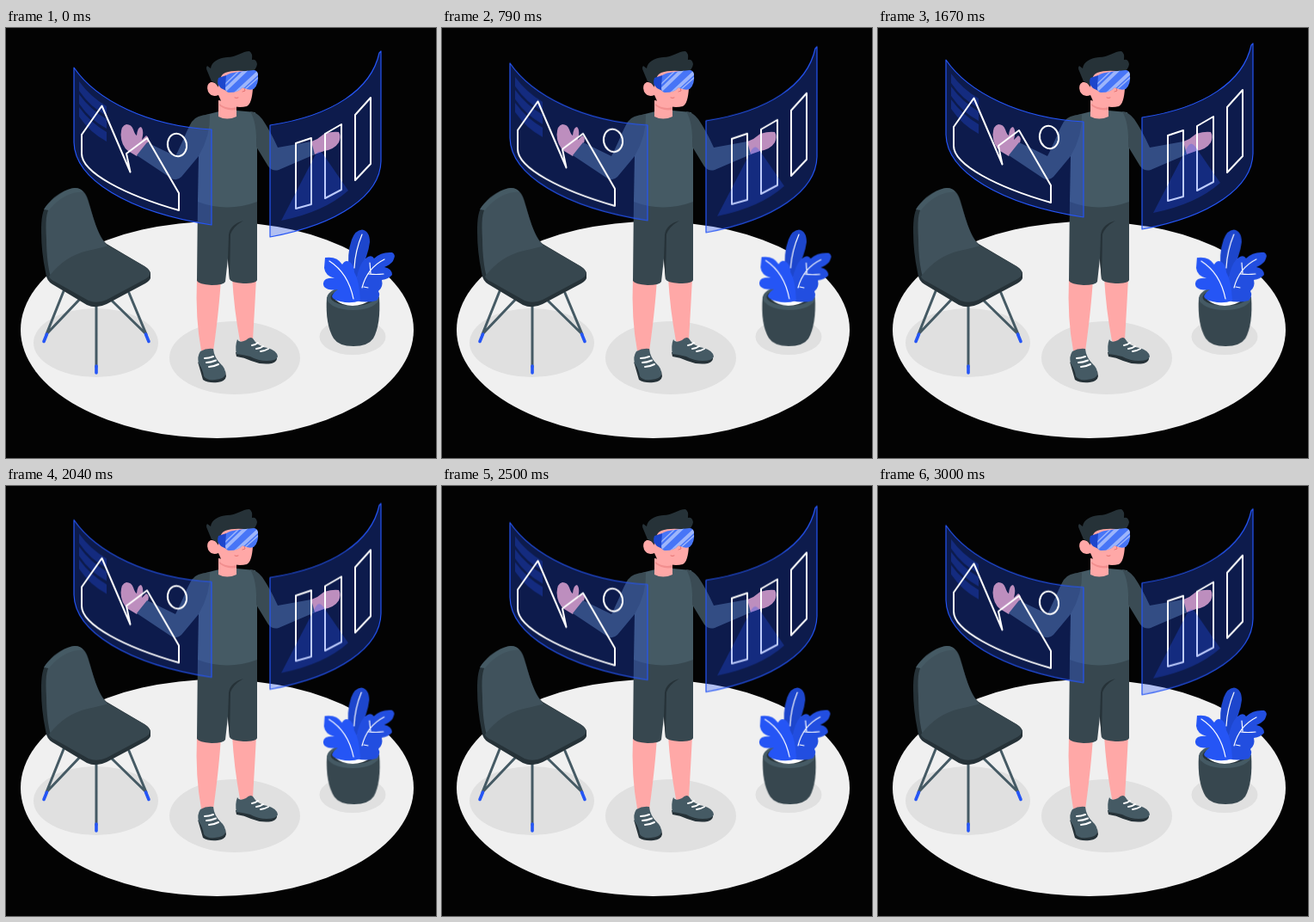
An HTML page that plays this animation: 500x500 px, repeating every 3040 ms.

```html
<!DOCTYPE html>
<html lang="en">
<head>
<meta charset="utf-8">
<title>Virtual reality workspace</title>
<style>
  :root { --blue: #2555f5; --ink: #263238; --dark: #37474f; --mid: #455a64; --skin: #ffa8a7; }
  html, body { margin: 0; width: 100%; height: 100%; overflow: hidden; background: #030303; }
  svg { display: block; width: 100%; height: 100%; }
  .blue { fill: var(--blue); }
  .ink { fill: var(--ink); }
  .dark { fill: var(--dark); }
  .mid { fill: var(--mid); }
  .sleeve { fill: #3a4b54; }
  .skin { fill: var(--skin); }
  .shade { fill: #e0e0e0; }
  .line { fill: none; stroke-linecap: round; stroke-linejoin: round; }
  .glass { fill: var(--blue); fill-opacity: .3; stroke: var(--blue); stroke-width: 1.2; stroke-linejoin: round; }
  .tint { fill: var(--blue); opacity: .3; }
  .chart { fill: none; stroke: #fff; stroke-width: 2; stroke-linejoin: round; }
  .float { animation: float 3040ms linear infinite; }
  .sway { transform-box: view-box; transform-origin: 411px 302px; animation: sway 3040ms linear infinite; }
  @keyframes float { 50% { transform: translateY(-10px); } }
  @keyframes sway {
    25% { transform: rotate(1deg); }
    75% { transform: rotate(-1deg); }
  }
</style>
</head>
<body>
<svg viewBox="0 0 500 500">
  <defs>
    <clipPath id="visor"><path d="M256 55Q260 52 270 51L288 49Q292 49 293 54Q294 66 288 71Q282 73 275 69Q270 75 260 75Q255 75 255 69Z"/></clipPath>
  </defs>

  <ellipse cx="245.5" cy="351" rx="228.5" ry="126" fill="#f0f0f0"/>
  <g class="shade">
    <ellipse cx="104.5" cy="366" rx="72.5" ry="40"/>
    <ellipse cx="266" cy="383.5" rx="76" ry="42.5"/>
    <ellipse cx="403" cy="359" rx="38.5" ry="21"/>
  </g>

  <!-- chair -->
  <g class="line" stroke-width="3">
    <path stroke="#455a64" d="M67 306 47 356M87 314 48 355M105 320V394M143 308 163 356M122 316 163 356"/>
    <path stroke="#2555f5" stroke-width="3.6" d="M47.500 356 44 364.500M105 393V401M162.500 356 166 364.500"/>
  </g>
  <path class="ink" d="M41 237C41 222 42 211 49 204C57 194 69 187 80 186C87 186 92 190 95 198C101 217 106 241 117 251L161 277Q168 281 168 286V291Q167 294 162 297L117 321Q105 327 94 322L54 298Q47 294 46 284Q41 260 41 237Z"/>
  <path fill="#40525c" d="M47 246C46 226 46 214 52 207C60 197 71 189 81 187C88 187 92 191 95 200C101 218 106 241 117 252L119 254L60 291L52 289C49 280 47 262 47 246Z"/>
  <path class="mid" d="M44 211C52 199 68 187 80 186Q87 186 90 191C75 189 58 201 50 212Z"/>
  <path class="dark" d="M50 289C62 273 77 263 95 259Q109 256 119 253L161 277Q168 282 167 287Q166 290 160 293L117 316Q106 321 96 317L57 295Q52 293 50 289Z"/>

  <!-- legs and shoes -->
  <path class="skin" d="M222 291H250Q248 326 241 376Q234 379 227 375Q220 338 222 291ZM263 290H291Q289 330 287 362Q280 368 272 364Q265 326 263 290Z"/>
  <path class="ink" d="M223 388 229 409Q235 413 246 412Q255 411 256 405L255 399 234 400Z"/>
  <path class="mid" d="M226 376Q233 372 241 373Q242 383 249 390Q256 396 255 403Q254 408 243 409Q233 410 230 405Q229 397 224 390Q222 382 226 376Z"/>
  <path class="ink" d="M267 377 268 382Q277 383 285 387Q297 392 309 390Q316 388 315 382Z"/>
  <path class="mid" d="M269 362Q271 367 279 363Q284 358 287 361Q292 370 304 372Q315 375 316 382Q315 387 303 387Q293 387 284 382Q276 380 268 379Q266 370 269 362Z"/>
  <path class="line" stroke="#fff" stroke-width="2" d="M231 384Q236 384 241 382M233 389Q238 389 244 386.500M236 394Q241 394 247 391M286 369Q289 369 293 366M291 373Q295 373 299 370M296 376Q300 376 305 373"/>

  <!-- shorts -->
  <path class="dark" d="M223 198H292V293Q291 297 276 297Q261 296 260 292L258 268 255 295Q253 299 239 299Q224 298 222 294Z"/>
  <path class="ink" d="M276 224Q261 228 259 240L258 270 260 293 261 240Q264 231 276 224Z"/>

  <!-- hands -->
  <path class="skin" d="M152 149 142 143Q134 137 133.500 124Q134 113 140 112Q146 112 148 118Q150 124 152 125Q153 115 157 115Q160 118 159 125L158 130 163 125Q168 127 164 136Z"/>
  <path class="skin" d="M353 133 362 129 370 123Q380 120 387 121Q390 126 387 133Q382 141 370 143L356 148Z"/>

  <!-- shirt -->
  <path class="mid" d="M248 97 232 101 224 148 223 202Q257 215 292 202V138L290 98 268 96Z"/>
  <path class="sleeve" d="M237 100.500Q221 101 216 109C210 119 205 134 197 149L164 133 152 148 191 174Q198 179 204 173L224 149Q238 125 237 100.500Z"/>
  <path class="sleeve" d="M284 97Q292 98 298 106Q307 119 316 139L355 132 359 147 317 165Q310 167 305 161L291 138Q292 110 284 97Z"/>

  <!-- head -->
  <path class="skin" d="M247 84V103Q257 108 268 103V88Z"/>
  <path fill="#f28f8f" d="M248 88Q257 95 268 92L268 95Q256 97 248 90Z"/>
  <path class="skin" d="M245 53Q265 41 286 51L287 70Q286 88 280 91Q267 94 251 87L247 78Q239 81 235 74Q232 66 238 63Q244 62 247 69Z"/>
  <path class="ink" d="M239 62Q236 55 234 50Q232 46 234 44L238 47C239 39 247 35 257 34C268 34 275 27 283 27Q287 29 286 37Q291 36 292 42Q291 49 285 51Q266 48 255 52Q250 54 249 60L246 68Q245 64 239 62Z"/>
  <path class="line" stroke="#e57373" stroke-width="1" d="M266 81Q268 82 270 81M277 70 278 73 275 74"/>
  <path fill="#1d46cc" d="M247 58 256 55 260 75 250 70Q244 65 247 58Z"/>
  <g clip-path="url(#visor)">
    <path fill="#4775f7" d="M245 45H296V78H245Z"/>
    <path class="line" stroke="#9db5fb" stroke-width="4" d="M255 72 280 48M267 76 295 50"/>
    <path class="line" stroke="#9db5fb" stroke-width="1.500" d="M254 66 272 49M276 73 295 56"/>
  </g>

  <!-- floating screens -->
  <g class="float">
    <path class="glass" d="M79 46C105 84 165 114 239 118V229C142 214 80 176 79 133Z"/>
    <path class="tint" d="M85 62Q98 80 117 91V102Q98 92 85 73ZM85 77Q98 95 117 106V117Q98 107 85 88ZM85 92Q98 110 117 121V132Q98 122 85 103Z"/>
    <path class="chart" d="M88 124 111.500 90.500 144.500 167.500 140 146 164 128 201 192V212C138 194 88 168 88 146Z"/>
    <ellipse class="chart" cx="199" cy="136" rx="11" ry="13.200" transform="rotate(-12 199 136)"/>

    <path class="glass" d="M307 113C380 102 425 71 434 29L436 27V155C435 194 388 228 307 243Z"/>
    <path class="chart" d="M337 134 355 128V205L337 210ZM371 123 390 112V188L371 198ZM406 101 424 81V158L406 177Z"/>
    <path class="tint" d="M320 224 360 147Q364 140 369 147L398 189Q370 214 320 224Z"/>
  </g>

  <!-- plant -->
  <g class="sway">
    <path class="dark" d="M373 313Q371 345 381 361Q387 370 404 370Q421 370 427 361Q436 345 434 313Z"/>
    <ellipse class="mid" cx="403.500" cy="314" rx="30.500" ry="14"/>
    <ellipse class="ink" cx="403.500" cy="313" rx="26" ry="10"/>
    <path fill="#fff" d="M383 316Q403 307 424 316Q415 323 403 323Q391 323 383 316Z"/>
    <path fill="#1d46cc" d="M399 287Q396 262 402 246Q406 235 414 234.500Q423 236 423 249Q421 266 411 282L407 295Z"/>
    <path fill="#224ee0" d="M407 317Q405 301 409 285Q413 270 421 266Q426 264 428 268Q436 260 449 261Q454 263 450 271Q446 276 440 278Q449 280 449 287Q445 292 437 293Q439 301 433 306Q436 311 431 317Q419 320 407 317Z"/>
    <path class="blue" d="M371 267Q385 265 391 275Q395 268 401 273Q405 278 405 284Q411 294 412 317Q401 321 389 318Q380 316 379 312Q381 307 386 304Q375 306 370 301Q367 295 372 292Q377 290 382 291Q371 288 370 279Z"/>
    <path class="line" stroke="#fff" stroke-width="1.200" d="M414 240Q406 259 405 279M376 271Q398 285 404 315M440 269Q420 279 414 302M423 273 424 285M422 286Q430 287 439 286M416 301 421 302"/>
  </g>
</svg>
</body>
</html>
```
